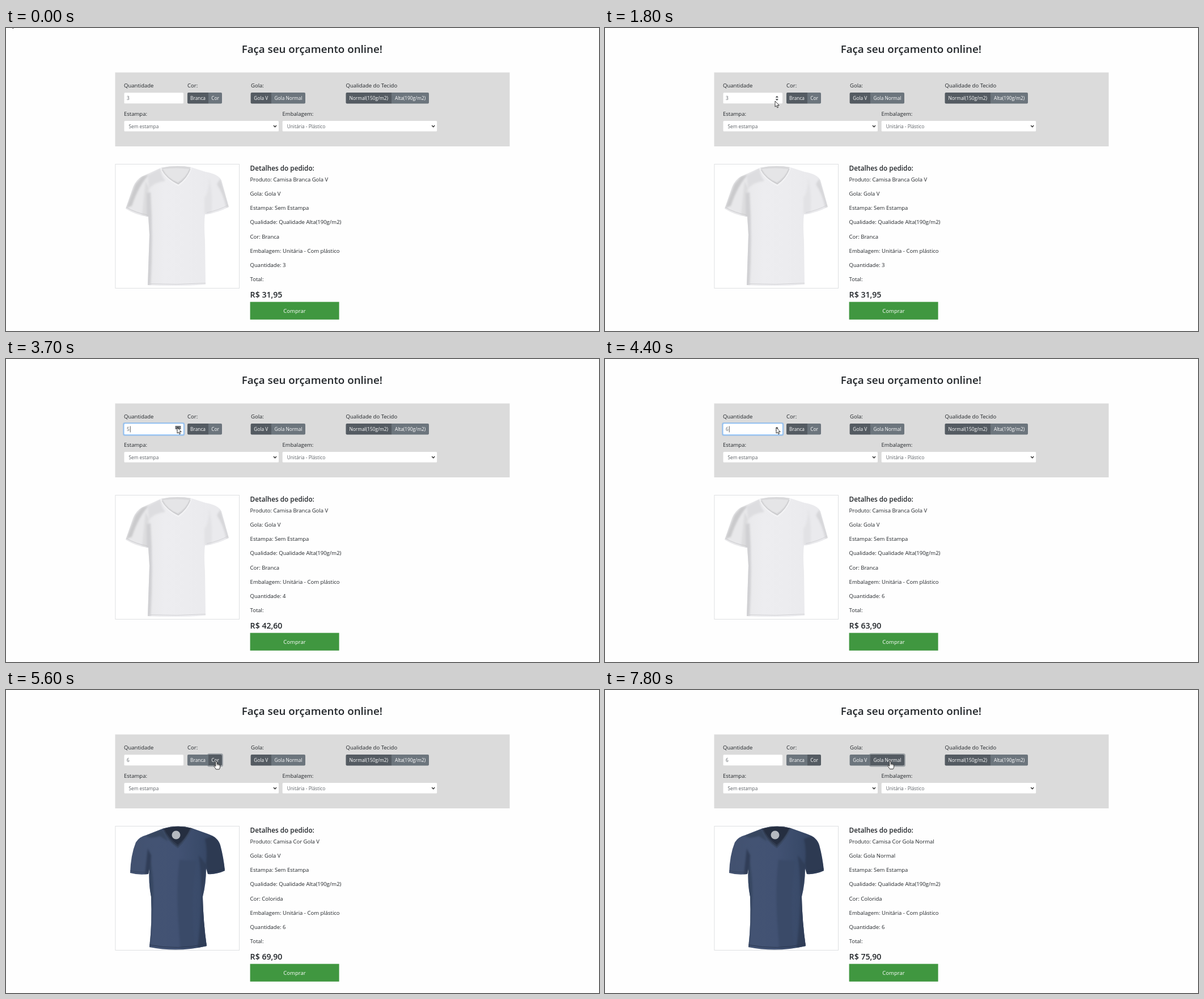
An HTML page with a canvas for the animation above (8000 ms loop, 1046x535 px).

```html
<!DOCTYPE html>
<html lang="pt-BR">
<head>
<meta charset="utf-8">
<title>Orçamento online</title>
<style>
html, body { margin: 0; width: 100%; height: 100%; overflow: hidden; background: #fefefe; }
canvas { display: block; width: 1046px; height: 535px; }
</style>
</head>
<body>
<canvas id="stage"></canvas>
<script>
const W = 1046, H = 535, LOOP = 8000;
const canvas = document.getElementById('stage');
const ctx = canvas.getContext('2d');
const ratio = window.devicePixelRatio || 1;
canvas.width = W * ratio;
canvas.height = H * ratio;

const FONT = '"Open Sans", "Noto Sans", sans-serif';
const BODY = 9.53, SMALL = 8.32;
const INK = '#212529', FIELD_INK = '#5c6166';
const GREY = '#6c757d', GREY_HOVER = '#5a6268', GREY_ACTIVE = '#545b62';

// Value changes over time: [start in ms, value]
const TYPED = [[0, 3], [1900, 2], [2400, 1], [3200, 2], [3400, 3], [3500, 4], [3700, 5], [4100, 6]];
const ORDERED = [[0, 3], [2100, 2], [2500, 1], [3300, 2], [3500, 3], [3700, 4], [3900, 5], [4300, 6]];
// Pointer path: [ms, x, y]
const PATH = [
  [0, 8, -11], [300, 90, 34], [600, 220, 98], [900, 317, 125], [1000, 312, 126],
  [1200, 281, 127], [1400, 299, 129], [1700, 299, 129], [1800, 300, 129],
  [2800, 300, 129], [2900, 302, 122], [3600, 302, 121], [4400, 302, 121],
  [4700, 303, 123], [4800, 310, 125], [5100, 371, 126], [5900, 371, 126],
  [6000, 372, 130], [6300, 402, 153], [6600, 458, 152], [6800, 492, 143],
  [6900, 499, 133], [7000, 501, 129], [7100, 501, 129], [7300, 503, 125.5], [8000, 503, 125.5]
];

const valueAt = (keys, t) => keys.filter(k => k[0] <= t).pop()[1];

function pointerAt(t) {
  const i = PATH.findIndex(p => p[0] > t);
  const [t0, x0, y0] = PATH[i - 1], [t1, x1, y1] = PATH[i];
  const k = (t - t0) / (t1 - t0);
  return { x: x0 + (x1 - x0) * k, y: y0 + (y1 - y0) * k };
}

function text(str, x, y, size = BODY, color = INK, weight = 400, align = 'left') {
  ctx.font = `${weight} ${size}px ${FONT}`;
  ctx.fillStyle = color;
  ctx.textAlign = align;
  ctx.fillText(str, x, y);
}

function rect(x, y, w, h, color) {
  ctx.fillStyle = color;
  ctx.fillRect(x, y, w, h);
}

function rounded(x, y, w, h, radii) {
  ctx.beginPath();
  ctx.roundRect(x, y, w, h, radii);
}

function box(x, y, w, h, radii, color) {
  rounded(x, y, w, h, radii);
  ctx.fillStyle = color;
  ctx.fill();
}

function shape(d, fill, stroke, width = 1) {
  const path = new Path2D(d);
  if (fill) { ctx.fillStyle = fill; ctx.fill(path); }
  if (stroke) { ctx.strokeStyle = stroke; ctx.lineWidth = width; ctx.stroke(path); }
}

function gradient(x0, x1, ...colors) {
  const g = ctx.createLinearGradient(x0, 0, x1, 0);
  colors.forEach((c, i) => g.addColorStop(i / (colors.length - 1), c));
  return g;
}

// Fills the outline, then paints soft folds and crisp seams inside it.
function cloth(outline, fill, folds, seams) {
  ctx.save();
  shape(outline, fill);
  ctx.clip(new Path2D(outline));
  ctx.filter = `blur(${1.6 * ratio}px)`;
  folds.forEach(([color, d]) => shape(d, color));
  ctx.filter = 'none';
  seams.forEach(([color, d]) => shape(d, null, color));
  ctx.restore();
}

const inside = (p, x, y, w, h) => p.x >= x && p.x < x + w && p.y >= y && p.y < y + h;

function toggle(x, split, end, labels, active, pointer, focused) {
  [[x, split], [split, end]].forEach(([a, b], i) => {
    const hover = inside(pointer, a, 114, b - a, 20);
    const radii = i ? [0, 2, 2, 0] : [2, 0, 0, 2];
    box(a, 114, b - a, 19.5, radii, i === active ? GREY_ACTIVE : hover ? GREY_HOVER : GREY);
    text(labels[i], (a + b) / 2, 127, SMALL, '#fff', 400, 'center');
  });
  if (focused) {
    rounded(split - 1, 113, end - split + 2, 21.5, 2.5);
    ctx.strokeStyle = 'rgba(108,117,125,.55)';
    ctx.lineWidth = 2;
    ctx.stroke();
  }
}

function select(x, label) {
  box(x, 164, 272.5, 18.5, 1.5, '#fff');
  text(label, x + 8, 176.7, SMALL, FIELD_INK);
  shape(`M${x + 263.5} 172 l2.5 2.7 l2.5 -2.7`, null, '#2b2b2b', 1.4);
}

function quantityField(s) {
  if (s.inputFocus) {
    box(206.2, 112, 109, 23.7, 3, 'rgba(0,123,255,.25)');
    box(207.6, 113.4, 106.2, 20.9, 2.2, '#80bdff');
  }
  box(208.5, 114.3, 104.5, 19, 1.5, '#fff');
  text(s.typed, 213, 127, SMALL, FIELD_INK);
  if (s.caret) rect(218.8, 118.5, 0.8, 11, '#333');
  if (inside(s.pointer, 208, 114, 105, 20)) {
    if (s.pressed) rect(298.5, s.pointer.y < 125 ? 118 : 124, 10, 6, '#70757a');
    shape('M300.7 122.7h5.2l-2.6-3z M300.7 125.3h5.2l-2.6 3z', '#45484b');
  }
}

function whiteShirt() {
  cloth(
    'M273 247 Q300 241 327 246 L352 254 Q375 258 380 269 L393 316 Q374 326 354 329 L351 329 ' +
    'Q349 345 351 375 L352 453 Q302 457 250 454 L253 365 L251 333 H249 Q228 330 211 319 ' +
    'L224 281 Q230 267 240 262Z',
    gradient(240, 360, '#e8e8ea', '#ededf0', '#ececef', '#eaeaed'),
    [
      ['#cacacc', 'M228 276 L240 262 L252 259 Q234 278 222 314 L212 318Z'],
      ['#dcdcde', 'M246 270 L252 282 L250 333 L240 331Z'],
      ['#dddde0', 'M250 260 L273 247 Q272 258 281 270 Q262 272 252 284Z'],
      ['#d0d0d3', 'M248 292 L255 290 Q260 370 255 455 H248Z'],
      ['#e2e2e5', 'M350 300 Q359 286 358 266 Q366 296 362 328 H350Z'],
      ['#d6d6d9', 'M378 266 L394 316 L389 318 Q383 292 372 276Z']
    ],
    [
      ['#cbcbce', 'M211 316 Q230 327 250 330'],
      ['#d2d2d5', 'M354 326 Q375 322 393 312'],
      ['#d2d2d5', 'M250 451.5 Q302 454 352 450.5']
    ]
  );
  shape('M273 247 Q300 241 327 246 Q321 266 304 278 Q282 268 273 247Z', '#d9d9db');
  shape('M277 249 Q300 246 323 249 Q317 264 303 272 Q285 265 277 249Z', '#e5e5e7');
  shape('M273 247 Q280 266 304 278 Q321 267 327 246', null, '#f2f2f4', 2.6);
  shape('M275 250 Q283 266 304 275 Q319 265 325 249', null, '#bcbcbf', 0.8);
}

function blueShirt() {
  cloth(
    'M276 245 Q302 237 328 244 L356 254 Q374 260 378 274 Q384 296 386 319 Q371 326 356 325 ' +
    'L353 315 Q353 342 347 365 Q348 410 354 452 Q303 464 253 454 Q258 410 256 365 ' +
    'Q251 340 253 315 L251 325 Q233 327 219 323 Q220 291 229 269 Q235 259 248 256Z',
    gradient(220, 385, '#42516f', '#435373', '#425273', '#394a69', '#303e59'),
    [
      ['#37465f', 'M276 245 L246 257 Q255 264 271 258 L286 267Z'],
      ['#364661', 'M252 290 Q262 330 259 378 L254 456 H250 Z'],
      ['#303e58', 'M340 292 Q350 355 338 456 H357 L347 364 L354 309Z'],
      ['#3a4a68', 'M306 300 Q298 360 308 456 H334 Q324 370 336 302Z'],
      ['#2d3a52', 'M353 307 Q356 282 351 263 L368 257 L378 276 L387 320 L356 326Z'],
      ['#303d57', 'M250 280 Q248 300 245 326 H253 L256 292Z']
    ],
    [
      ['#36445f', 'M219 319 Q234 323 252 321'],
      ['#263349', 'M355 321 Q372 321 386 315'],
      ['#2a3750', 'M253 450 Q303 460 354 448']
    ]
  );
  shape('M276 245 Q302 237 328 244 Q318 265 303 279 Q285 266 276 245Z', '#303b50');
  shape('M279 245 Q302 239 325 244 Q316 263 303 273 Q287 262 279 245Z', '#252e40');
  shape('M276 246 Q285 266 303 278 Q318 264 327 245', null, '#3a4963', 2.2);
  ctx.beginPath();
  ctx.arc(300, 256, 7.5, 0, Math.PI * 2);
  ctx.fillStyle = '#b4b9c0';
  ctx.fill();
}

function drawPointer({ x, y }) {
  const onButton = [[320, 61], [432, 96], [600, 146]].some(([a, w]) => inside({ x, y }, a, 114, w, 20));
  ctx.save();
  ctx.translate(x, y);
  ctx.lineJoin = 'round';
  if (onButton) {
    shape('M-1.2 1 Q0 -.5 1.2 1 V5 Q2.4 4.2 3.2 5.4 Q4.4 4.8 5 6 Q6.5 5.6 6.6 7.2 ' +
      'V10 Q6.5 12 5.2 14 H-.6 Q-2 11.5 -4 9 Q-4 7.2 -2.4 7.8 L-1.2 9Z', '#fff', '#222', 0.9);
    shape('M1.2 5 V7.5 M3.2 5.5 V7.7 M5 6.2 V8', null, '#222', 0.6);
  } else if (inside({ x, y }, 208, 114, 88, 20)) {
    shape('M-2 -5 H2 M0 -5 V5 M-2 5 H2', null, '#222', 0.9);
  } else {
    shape('M0 0 V10.2 L2.3 8.1 L3.9 11.8 L5.6 11 L4 7.5 H7.2Z', '#fff', '#222', 0.9);
  }
  ctx.restore();
}

function stateAt(t) {
  const typed = valueAt(TYPED, t), ordered = valueAt(ORDERED, t);
  const inputFocus = t >= 1900 && t < 5400;
  const lastEdit = TYPED.filter(k => k[0] <= t).pop()[0];
  const colored = t >= 5500, plainCollar = t >= 7700;
  return {
    typed, ordered, inputFocus, colored, plainCollar,
    pointer: pointerAt(t),
    pressed: typed !== ordered,
    caret: inputFocus && Math.floor((t - lastEdit) / 500) % 2 === 0,
    colorFocus: t >= 5400 && t < 7600,
    collarFocus: t >= 7600,
    total: ordered * (10.65 + (colored ? 1 : 0) + (plainCollar ? 1 : 0))
  };
}

function drawForm(s) {
  rect(192.5, 78.5, 696, 130.5, '#dbdbdb');
  [['Quantidade', 208, 105.2], ['Cor:', 320, 105.2], ['Gola:', 432, 105.2],
    ['Qualidade do Tecido', 599.5, 105.2], ['Estampa:', 208, 154.8], ['Embalagem:', 487.5, 154.8]
  ].forEach(label => text(...label));
  quantityField(s);
  toggle(320, 357, 381, ['Branca', 'Cor'], s.colored ? 1 : 0, s.pointer, s.colorFocus);
  toggle(431.6, 468, 528, ['Gola V', 'Gola Normal'], s.plainCollar ? 1 : 0, s.pointer, s.collarFocus);
  toggle(599.5, 680, 746, ['Normal(150g/m2)', 'Alta(190g/m2)'], 0, s.pointer, false);
  select(208.5, 'Sem estampa');
  select(487.7, 'Unitária - Plástico');
}

function drawOrder(s) {
  const collar = s.plainCollar ? 'Gola Normal' : 'Gola V';
  rect(192.5, 240, 219.5, 220, '#dee0e2');
  rect(193.5, 241, 217.5, 218, '#fff');
  s.colored ? blueShirt() : whiteShirt();
  text('Detalhes do pedido:', 430.6, 252.3, 11.78, INK, 600);
  [
    `Produto: Camisa ${s.colored ? 'Cor' : 'Branca'} ${collar}`,
    `Gola: ${collar}`,
    'Estampa: Sem Estampa',
    'Qualidade: Qualidade Alta(190g/m2)',
    `Cor: ${s.colored ? 'Colorida' : 'Branca'}`,
    'Embalagem: Unitária - Com plástico',
    `Quantidade: ${s.ordered}`,
    'Total:'
  ].forEach((line, i) => text(line, 430.6, 271.3 + i * 25.05));
  text('R$ ' + s.total.toFixed(2).replace('.', ','), 430.6, 475.5, 14.15, INK, 600);
  rect(430.6, 483.6, 157, 31.2, '#409740');
  text('Comprar', 509, 502.7, BODY, '#fff', 400, 'center');
}

function render(now) {
  const t = Math.floor((now % LOOP) / 100) * 100;
  const s = stateAt(t);
  ctx.setTransform(ratio, 0, 0, ratio, 0, 0);
  rect(0, 0, W, H, '#fefefe');
  text('Faça seu orçamento online!', 539.8, 44.2, 18.8, INK, 600, 'center');
  drawForm(s);
  drawOrder(s);
  drawPointer(s.pointer);
}

const start = performance.now();
function tick() {
  render(performance.now() - start);
  requestAnimationFrame(tick);
}
tick();
</script>
</body>
</html>
```
